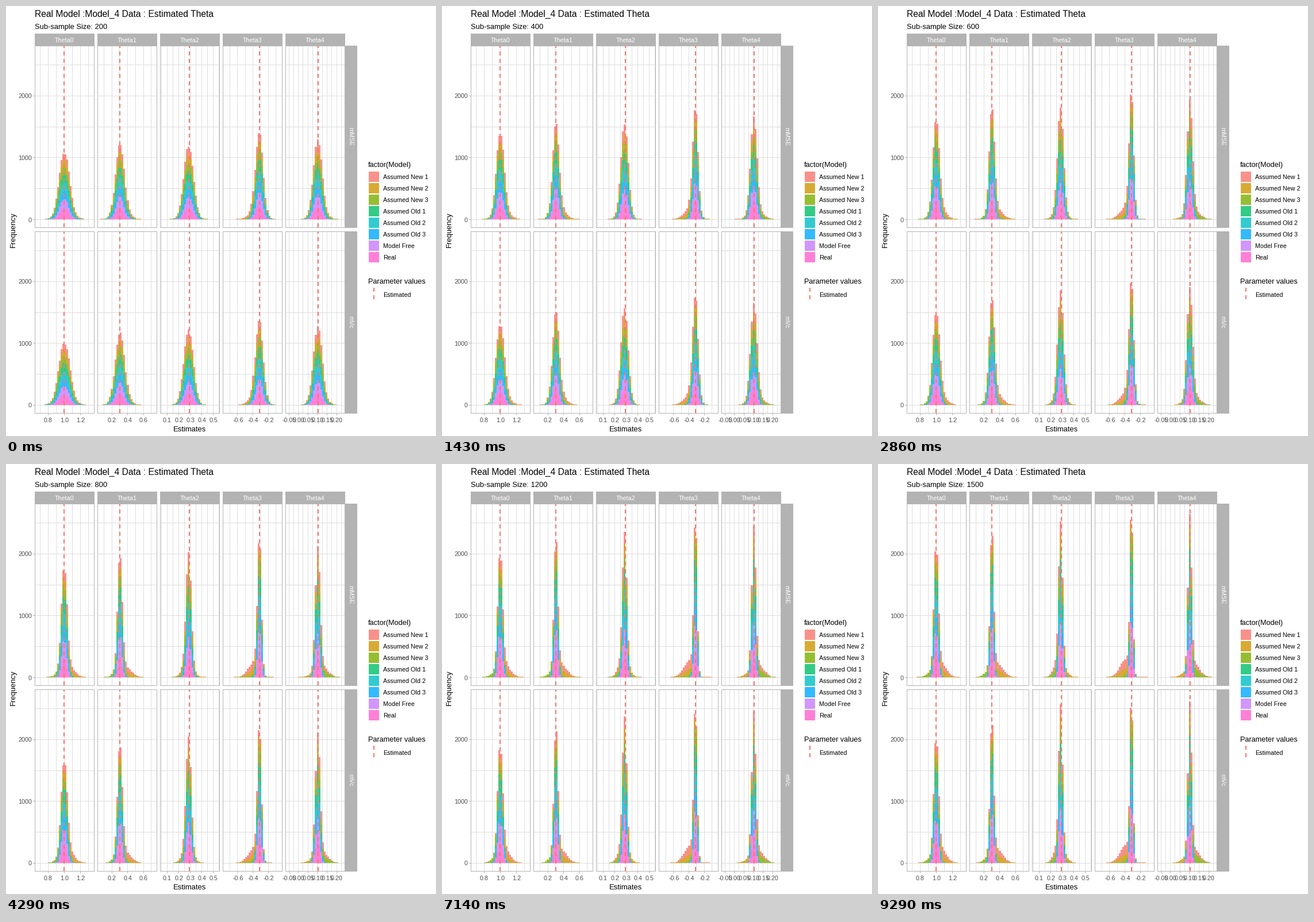
Write a matplotlib script that moves like this. It is 748 px wide and 748 px high and loops after 10000 ms.

```python
import math
import numpy as np
import matplotlib.pyplot as plt
from matplotlib.animation import FuncAnimation
from matplotlib.collections import PolyCollection
from matplotlib.colors import to_rgba
from matplotlib.patches import Rectangle

SIZE, DPI = 748, 100
STEPS, HOLD = 14, 713
BINS, BIN_W = 30, 3.12
UNIT = 0.1076                      # pixels per count
PANEL_W, PANEL_H = 103, 316
LEFTS = [50, 159, 268, 377, 486]
TOPS = [69, 392]
BASES = [371, 694]
GREY, GRID, RED = "#B3B3B3", "#DEDEDE", "#F8766D"

# bottom of the stack first
MODELS = [("Real", "#FF61CC"), ("Model Free", "#C77CFF"),
          ("Assumed Old 3", "#00A9FF"), ("Assumed Old 2", "#00BFC4"),
          ("Assumed Old 1", "#00BE67"), ("Assumed New 3", "#7CAE00"),
          ("Assumed New 2", "#CD9600"), ("Assumed New 1", "#F8766D")]
SPREAD = [0.86, 0.88, 1.07, 1.07, 1.07, 1.1, 1.1, 1.1]

# grid: first line, step, count; ticks: first labelled line, value, step, digits, count
# core: spread per row; tails: weight, mode, left sd, right sd
THETAS = [
    dict(grid=(59, 14, 7), ticks=(1, 0.8, 0.2, 1, 3), line=100,
         centre=14.93, core=(42, 45.5),
         tails=[(450, 13, 2.6, 1), (600, 17.3, 1.2, 3.2), (650, 17.3, 1.2, 3)]),
    dict(grid=(170.3, 13.75, 7), ticks=(1, 0.2, 0.2, 1, 3), line=197,
         centre=11.08, core=(36.6, 38.2),
         tails=[(400, 9.2, 2.2, 1), (650, 13.6, 1.1, 3.6), (600, 13.6, 1.1, 3.2)]),
    dict(grid=(270, 10.05, 11), ticks=(1, 0.1, 0.1, 1, 5), line=318,
         centre=14.45, core=(38.9, 38.2),
         tails=[(450, 12.4, 2.2, 1.2), (450, 16, 1, 2.4), (500, 12.6, 2, 1.1)]),
    dict(grid=(389.5, 13.3, 7), ticks=(1, -0.6, 0.2, 1, 3), line=440,
         centre=18.95, core=(31.3, 32),
         tails=[(200, 17, 3, 2), (650, 16, 3.7, 1.2), (850, 16.2, 3.3, 1.2)]),
    dict(grid=(492, 8.3, 12), ticks=(0, -0.05, 0.05, 2, 6), line=542,
         centre=16.58, core=(34.9, 35.4),
         tails=[(700, 19, 1.1, 3.2), (300, 14, 2.4, 1), (500, 18.8, 1.1, 3)]),
]

EDGES = np.arange(BINS + 1)
erf = np.vectorize(math.erf)

fig = plt.figure(figsize=(SIZE / DPI, SIZE / DPI), dpi=DPI, facecolor="white")
ax = fig.add_axes([0, 0, 1, 1])
ax.set_xlim(0, SIZE)
ax.set_ylim(SIZE, 0)
ax.axis("off")


def px(n):
    return n * 72 / DPI


def text(x, y, s, size, color="black", **kw):
    kw.setdefault("va", "baseline")
    return ax.text(x, y, s, fontsize=px(size), color=color,
                   family="Liberation Sans", zorder=6, **kw)


def box(x, y, w, h, color, z=1, alpha=None):
    ax.add_patch(Rectangle((x, y), w, h, fc=color, ec="none", lw=0,
                           alpha=alpha, zorder=z))


def hline(x, y, w, color, z=1):
    box(x, int(y), w, 1, color, z)


def vline(x, y, h, color, z=1):
    box(int(x), y, 1, h, color, z)


def dashes(x, bottom, top):
    y = bottom
    while y > top:
        end = max(y - 7, top)
        box(x, end, 2, y - end, RED, 4)
        y -= 13


def phi(z):
    return 0.5 * (1 + erf(z / math.sqrt(2)))


def normal_bins(mean, sd):
    return np.diff(phi((EDGES - mean) / sd))


def split_bins(mode, left, right):
    z = EDGES - mode
    low = 2 * left * phi(np.minimum(z, 0) / left)
    high = right * (2 * phi(np.maximum(z, 0) / right) - 1)
    return np.diff((low + high) / (left + right))


def counts(theta, row, n, rng):
    """Counts per model and bin for a sub-sample of size n."""
    grow = 0.3 + 0.7 * math.log(n / 200) / math.log(7.5)
    sd = theta["core"][row] / math.sqrt(n) * (n / 900) ** 0.05
    far = normal_bins(theta["centre"], 6.5 - 2 * row)
    out = []
    for m, k in enumerate(SPREAD):
        body = normal_bins(theta["centre"], sd * k)
        if m < 5:
            h = 1000 * body
        else:
            w, *shape = theta["tails"][m - 5]
            w *= grow
            h = (970 - w) * body + w * split_bins(*shape) + 30 * far
        h = h + rng.normal(0, 0.3, BINS) * np.sqrt(h)
        out.append(np.maximum(h, 0))
    return np.array(out)


def draw_panel(theta, col, row):
    x, y, base = LEFTS[col], TOPS[row], BASES[row]
    first, step, num = theta["grid"]
    for i in range(6):
        hline(x, base + 0.5 - i * 500 * UNIT, PANEL_W, GRID)
    for i in range(num):
        vline(first + i * step, y, PANEL_H, GRID)
    dashes(theta["line"], y + PANEL_H, y + 1)
    for yy in (y, y + PANEL_H):
        hline(x, yy, PANEL_W + 1, GREY, 5)
    for xx in (x, x + PANEL_W):
        vline(xx, y, PANEL_H + 1, GREY, 5)


def draw_axes():
    for base in BASES:
        for i in range(3):
            y = base + 0.5 - i * 1000 * UNIT
            hline(47, y, 3, GREY)
            text(45, y + 4, str(i * 1000), 10.8, "#4D4D4D", ha="right")
    for theta in THETAS:
        first, step, _ = theta["grid"]
        start, value, inc, digits, num = theta["ticks"]
        for i in range(num):
            x = first + (start + 2 * i) * step
            vline(x, 709, 3, GREY)
            text(x + 0.5, 724, f"{value + i * inc + 1e-9:.{digits}f}", 10.8,
                 "#4D4D4D", ha="center")
    text(320, 740, "Estimates", 13, ha="center")
    text(13, 389, "Frequency", 13, rotation=90, ha="center", va="center")


def draw_strips():
    for i, x in enumerate(LEFTS):
        box(x, 48, PANEL_W + 1, 21, GREY)
        text(x + 51.5, 63, f"Theta{i}", 10.8, "white", ha="center")
    for y, name in zip(TOPS, ("mMSE", "mVc")):
        box(590, y, 21, PANEL_H + 1, GREY)
        text(599, y + 158, name, 10.8, "white", rotation=270,
             ha="center", va="center")


def draw_legend():
    text(630, 280, "factor(Model)", 12.8)
    for i, (name, color) in enumerate(reversed(MODELS)):
        y = 288 + 20 * i
        box(631, y, 18, 18, color, alpha=0.8)
        text(656, y + 13, name, 10.8)
    text(630, 483, "Parameter values", 12.8)
    dashes(639, 510, 490)
    text(656, 506, "Estimated", 10.8)


for col, theta in enumerate(THETAS):
    for row in range(2):
        draw_panel(theta, col, row)
draw_axes()
draw_strips()
draw_legend()
text(50, 19, "Real Model :Model_4 Data : Estimated Theta", 15.6)
subtitle = text(50, 39.7, "", 12.9)
bars = PolyCollection([], linewidths=0, edgecolors="none",
                      antialiaseds=False, zorder=3)
ax.add_collection(bars, autolim=False)


def update(i):
    n = 200 + 100 * i
    rng = np.random.default_rng(40 + i)
    subtitle.set_text(f"Sub-sample Size: {n}")
    rects, colors = [], []
    for x0, theta in zip(LEFTS, THETAS):
        xs = np.round(x0 + 4.68 + BIN_W * EDGES)
        for row, base in enumerate(BASES):
            stack = np.cumsum(counts(theta, row, n, rng), axis=0) * UNIT
            tops = np.floor(stack + 0.75)
            lows = np.vstack([np.zeros(BINS), tops[:-1]])
            for m, b in zip(*np.nonzero(tops > lows)):
                lo, hi = base - lows[m, b], base - tops[m, b]
                l, r = xs[b], xs[b + 1]
                rects.append([(l, lo), (r, lo), (r, hi), (l, hi)])
                colors.append(to_rgba(MODELS[m][1], 0.8))
    bars.set_verts(rects)
    bars.set_facecolor(colors)
    return bars, subtitle


anim = FuncAnimation(fig, update, frames=STEPS, interval=HOLD,
                     init_func=lambda: update(0), repeat=True,
                     repeat_delay=0, blit=False)
plt.show()
```
